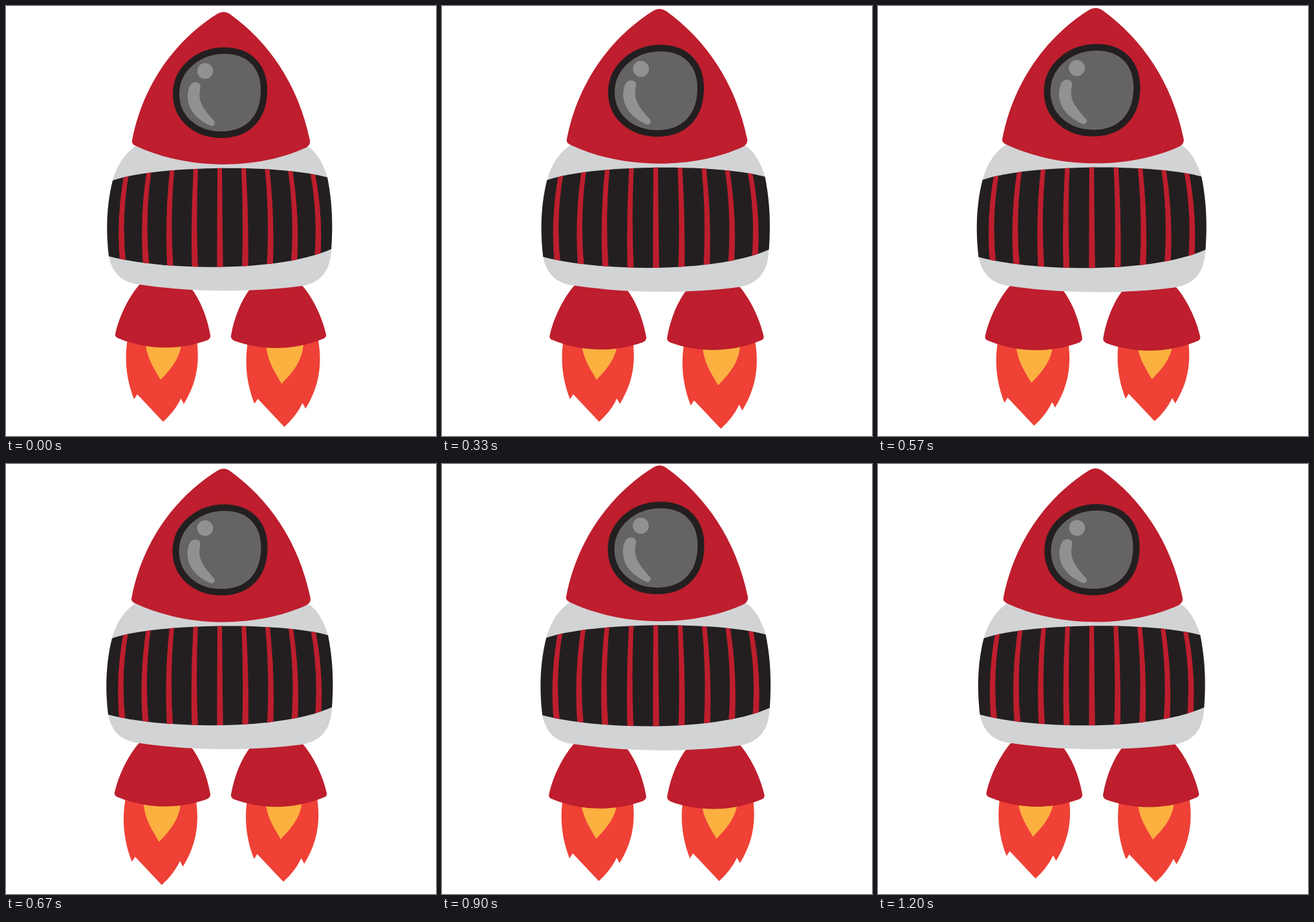
Animation of 665x665 px, one loop 1.23 s. Source, as an HTML page:

```html
<!DOCTYPE html>
<html lang="en">
<head>
<meta charset="utf-8">
<title>Rocket</title>
<style>
  html, body { margin: 0; height: 100%; overflow: hidden; background: #fff; }
  svg { display: block; width: 100%; height: 100%; }
</style>
</head>
<body>
<svg viewBox="0 0 665 665">
  <defs>
    <g id="flame">
      <path fill="#ef4136" d="M190,505C182,540 185,575 198,608L203,600.5L243,643Q261,627 270.5,607L275,615.5C297,580 301,545 293,505Z"/>
      <path fill="#fbb040" d="M215,515C217,545 229,560 239,578C254,562 271,545 272,515Z"/>
    </g>
    <path id="booster" fill="#be1e2d" d="M250,422L208,429C190,449 175,480 169,507Q168,512 174,514C220,533 270,532 311,517Q317,514 316,509C311,480 300,454 286,436Z"/>
    <path id="band" d="M165,270C230,247 420,244 497,265C504,300 506,335 503,376C420,413 240,409 159,387C154,345 156,305 165,270Z"/>
    <clipPath id="bandClip"><use href="#band"/></clipPath>
  </defs>
  <use id="leftFlame" href="#flame"/>
  <g id="rightFlame"><use href="#flame" x="185"/></g>
  <g id="rocket">
    <use href="#booster"/>
    <use href="#booster" transform="matrix(-1 0 0 1 664 .7)"/>
    <path fill="#d2d3d5" d="M201,216C183,229 172,245 165,270C156,305 154,345 159,387C164,412 178,428 208,431C290,443 378,443 457,433C488,428 502,408 503,376C506,335 504,300 497,265C490,242 481,227 468,218Z"/>
    <use href="#band" fill="#231f20"/>
    <path id="stripes" fill="#be1e2d" clip-path="url(#bandClip)"/>
    <path fill="#be1e2d" d="M327,12Q337,6 347,13C405,55 452,120 470,208Q471,215 464,219C388,254 280,254 200,216Q194,213 195,208C212,120 263,52 327,12Z"/>
    <path fill="#656364" stroke="#231f20" stroke-width="10" d="M338,69C378,69 399,95 399,130C399,172 375,199 333,199C292,199 263,172 263,136C263,98 297,69 338,69Z"/>
    <g fill="#929092">
      <circle cx="308" cy="100.5" r="12.2"/>
      <path d="M293,118C300,118 302,123 300,130C296,150 309,163 322,178C325,182 321,187 316,185C290,173 280,155 281,137C282,125 286,118 293,118Z"/>
    </g>
  </g>
</svg>
<script>
const el = id => document.getElementById(id);

// Nine stripes bow outwards, crowd towards the sides and widen downwards.
function stripe(n) {
  const offset = 37 * n - .09 * n ** 3;
  const top = 330.5 + offset, bend = 330.5 + 1.11 * offset, bottom = 331 + 1.05 * offset;
  return `M${top - 3.5},250Q${bend - 4},327 ${bottom - 4.7},405` +
    `H${bottom + 4.7}Q${bend + 4},327 ${top + 3.5},250Z`;
}
el('stripes').setAttribute('d',
  Array.from({ length: 9 }, (_, i) => stripe(i - 4)).join(''));

// Key points of the shake: step, then growth in percent of each part.
const PARTS = ['rocket', 'leftFlame', 'rightFlame'];
const STEPS = 37, LOOP = 1230;
const keys = [
  [0, 0, 0, 2.5],
  [5, -1.9, 1.6, -.9],
  [10, 1.5, 0, 3.4],
  [17, 2, 1.9, -.3],
  [23, -.8, 3.1, 2.2],
  [27, 2.2, .6, .6],
  [31, -1.4, 2.5, 2.2],
  [33, 2, .9, 2.8],
  [36, .8, -.6, 1.2]
];
keys.push([STEPS, ...keys[0].slice(1)]);

function growthAt(step) {
  const i = keys.findIndex(key => key[0] > step);
  const [from, ...a] = keys[i - 1], [to, ...b] = keys[i];
  const u = (step - from) / (to - from);
  const ease = u * u * (3 - 2 * u);
  return a.map((v, j) => v + (b[j] - v) * ease);
}

function draw(now) {
  // 37 steps of a thirtieth of a second, each starting on a whole centisecond
  const centis = Math.floor(now % LOOP / 10);
  const growth = growthAt(Math.floor((3 * centis + 1) / 10));
  PARTS.forEach((id, i) => el(id).setAttribute('transform',
    `translate(332 324) scale(${1 + growth[i] / 100}) translate(-332 -324)`));
}

const start = performance.now();
function tick() {
  draw(performance.now() - start);
  requestAnimationFrame(tick);
}
tick();
</script>
</body>
</html>
```
